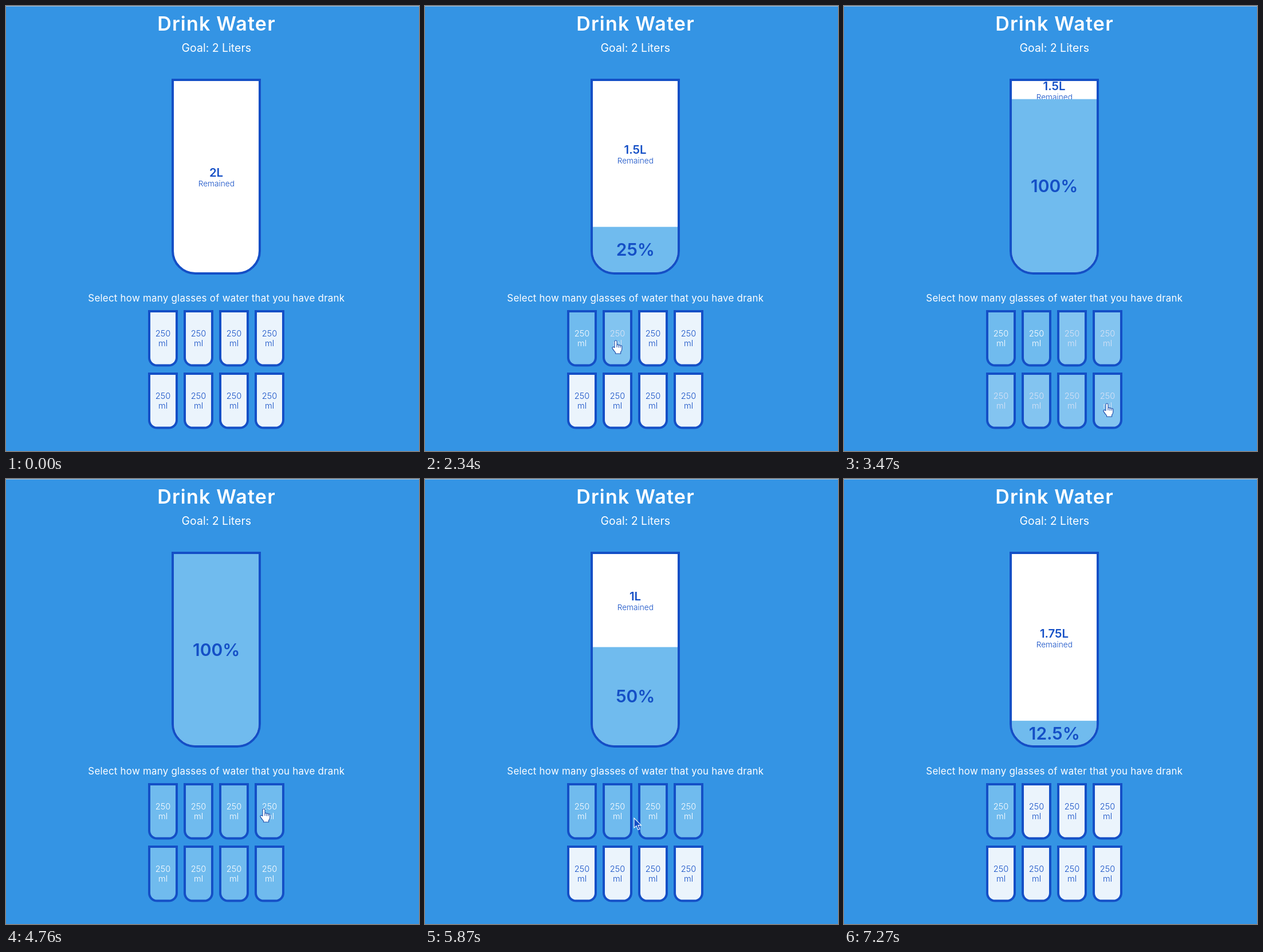
Recreate the animation shown at these times as an HTML page. Size 721 by 777 pixels, loop 7630 ms.

```html
<!DOCTYPE html>
<html lang="en">
<head>
<meta charset="utf-8">
<title>Drink Water</title>
<style>
  html, body { margin: 0; width: 100%; height: 100%; overflow: hidden; background: #3494e4; }
  svg { display: block; width: 721px; height: 777px; }
  text { font-family: Inter, "Open Sans", sans-serif; text-anchor: middle; fill: #fff; }
  .blue { fill: #144fc6; }
  .semi { font-weight: 600; }
  .light { font-weight: 300; }
  .cup { stroke: #144fc6; stroke-width: 4; }
</style>
</head>
<body>
<svg viewBox="0 0 721 777" xmlns="http://www.w3.org/2000/svg">
  <defs>
    <clipPath id="inside"><path id="insidePath"/></clipPath>
  </defs>
  <rect width="721" height="777" fill="#3494e4"/>
  <rect width="721" height="1" fill="#a3bfd8"/>
  <text class="semi" x="367.5" y="43" font-size="34" letter-spacing="1.2">Drink Water</text>
  <text x="367.3" y="80" font-size="19.5">Goal: 2 Liters</text>
  <path id="body" fill="#fff"/>
  <g clip-path="url(#inside)">
    <g id="remained">
      <text id="liters" class="blue semi" x="367" font-size="20.4"></text>
      <text class="blue light" x="367.3" y="17" font-size="13.7">Remained</text>
    </g>
    <rect id="water" x="293" width="148" fill="#70bbee"/>
    <text id="percent" class="blue semi" x="367.3" font-size="30"></text>
  </g>
  <path id="rim" class="cup" fill="none"/>
  <text x="367.3" y="516" font-size="16.9" letter-spacing=".25">Select how many glasses of water that you have drank</text>
  <g id="glasses"></g>
  <g id="hand" fill="#fff" stroke="#1a4aa8" stroke-width="1.1" stroke-linejoin="round">
    <path d="M-2 12.5V2a2 2 0 0 1 4 0V8a1.8 1.8 0 0 1 3.2.5 1.7 1.7 0 0 1 3 .8 1.5 1.5 0 0 1 2.6 1.2V15Q10.6 18 8.6 20V23H-.5V21Q-4 17-6 13.6C-6.6 12-4.5 10.8-3.4 11.8Z"/>
    <path d="M2 8v4M5.2 8.5v4M8.2 9.5v3"/>
  </g>
  <path id="arrow" d="M0 0V17L4 13.5L7 20.5L10 19.2L7 12.5H12.5Z" fill="#144fc6" stroke="#fff" stroke-width="1.1"/>
</svg>
<script>
const LOOP = 7630, FADE = 300, COUNT = 8;
const TOP = 131, BOTTOM = 465, FULL = 343;
const GLASS = { w: 52, h: 98.6 };
const $ = id => document.getElementById(id);

// time of the click, glasses filled after it
const clicks = [[-FADE, 0], [1284, 1], [2175, 2], [3308, 8], [4980, 4], [6460, 1]];

// pointer moves: begin, end, then where the tip comes to rest
const home = [640, 779];
const moves = [
  [0, 780, 307, 446],
  [820, 1150, 264, 573],
  [1450, 1690, 316, 581],
  [1860, 2050, 333, 584],
  [2360, 3000, 459, 694],
  [3560, 4190, 355, 640],
  [4220, 4550, 428, 585],
  [4690, 4760, 450, 576],
  [5100, 5450, 448, 590],
  [5480, 6230, 292, 594],
  [6500, 7260, 697, 785]
];

// Cup outline from its outer box; inset moves the line inwards
function cupPath(x, y, w, h, r, inset) {
  w -= 2 * inset; h -= 2 * inset; r -= inset;
  return `M${x + inset} ${y + inset}h${w}v${h - r}a${r} ${r} 0 0 1 ${-r} ${r}` +
    `h${2 * r - w}a${r} ${r} 0 0 1 ${-r} ${-r}Z`;
}

const bigCup = inset => cupPath(289, 127, 156, 342, 41.6, inset);
$('body').setAttribute('d', bigCup(2));
$('rim').setAttribute('d', bigCup(2));
$('insidePath').setAttribute('d', bigCup(4));

const glasses = Array.from({ length: COUNT }, (_, i) => {
  const x = 248 + 62 * (i % 4), y = 531 + 109 * (i >> 2);
  const g = document.createElementNS('http://www.w3.org/2000/svg', 'g');
  g.innerHTML = `<path class="cup" d="${cupPath(x, y, GLASS.w, GLASS.h, 15.6, 2)}"/>
    <g class="light" font-size="14.6"><text x="${x + 26}" y="${y + 45.6}">250</text>
    <text x="${x + 26}" y="${y + 63}">ml</text></g>`;
  $('glasses').append(g);
  return { x, y, shape: g.firstChild, labels: g.querySelectorAll('text') };
});

const clamp = x => Math.min(1, Math.max(0, x));
const lerp = (a, b, p) => a + (b - a) * p;
const mix = (a, b, p) => `rgb(${a.map((v, i) => Math.round(lerp(v, b[i], p)))})`;
const EMPTY = [235, 244, 252], WATER = [112, 187, 238], INK = [20, 79, 198], WHITE = [255, 255, 255];

// CSS "ease": cubic-bezier(.25, .1, .25, 1)
function ease(x) {
  if (x <= 0 || x >= 1) return clamp(x);
  const curve = (s, a, b) => 3 * s * (1 - s) ** 2 * a + 3 * s * s * (1 - s) * b + s ** 3;
  let lo = 0, hi = 1;
  for (let i = 0; i < 24; i++) {
    const mid = (lo + hi) / 2;
    if (curve(mid, .25, .25) < x) lo = mid; else hi = mid;
  }
  return curve(lo, .1, 1);
}

function pointer(t) {
  let [x, y] = home;
  for (const [begin, end, toX, toY] of moves) {
    const s = clamp((t - begin) / (end - begin));
    const p = s * s * (3 - 2 * s);
    x = lerp(x, toX, p);
    y = lerp(y, toY, p);
  }
  return [x, y];
}

function drawCup(from, to, p) {
  const height = Math.min(lerp(from, to, p) / COUNT * FULL, BOTTOM - TOP);
  const top = BOTTOM - height;
  $('water').setAttribute('y', top);
  $('water').setAttribute('height', height);
  $('percent').setAttribute('y', top + height / 2 + 11);
  $('percent').textContent = to ? to * 100 / COUNT + '%' : '';
  // the label keeps its last value while the cup is full
  $('liters').textContent = 2 - (to === COUNT ? from : to) / 4 + 'L';
  $('remained').setAttribute('transform', `translate(0 ${(TOP + top) / 2})`);
  $('remained').style.visibility = to === COUNT && p === 1 ? 'hidden' : 'visible';
}

function drawGlasses(from, to, p) {
  glasses.forEach((g, i) => {
    const f = lerp(i < from ? 1 : 0, i < to ? 1 : 0, p);
    g.shape.style.fill = mix(EMPTY, WATER, f);
    g.labels.forEach(l => l.style.fill = mix(INK, WHITE, f));
  });
}

function drawPointer(t) {
  const [x, y] = pointer(t);
  const over = glasses.some(g => x >= g.x && x <= g.x + GLASS.w && y >= g.y && y <= g.y + GLASS.h);
  for (const [id, on] of [['hand', over], ['arrow', !over]]) {
    $(id).setAttribute('transform', `translate(${x.toFixed(1)} ${y.toFixed(1)})`);
    $(id).style.visibility = on ? 'visible' : 'hidden';
  }
}

function render(t) {
  let n = clicks.length - 1;
  while (clicks[n][0] > t) n--;
  const [start, to] = clicks[n];
  const from = n ? clicks[n - 1][1] : 0;
  const p = ease((t - start) / FADE);
  drawCup(from, to, p);
  drawGlasses(from, to, p);
  drawPointer(t);
}

const begin = performance.now();
function tick() {
  render((performance.now() - begin) % LOOP);
  requestAnimationFrame(tick);
}
tick();
</script>
</body>
</html>
```
